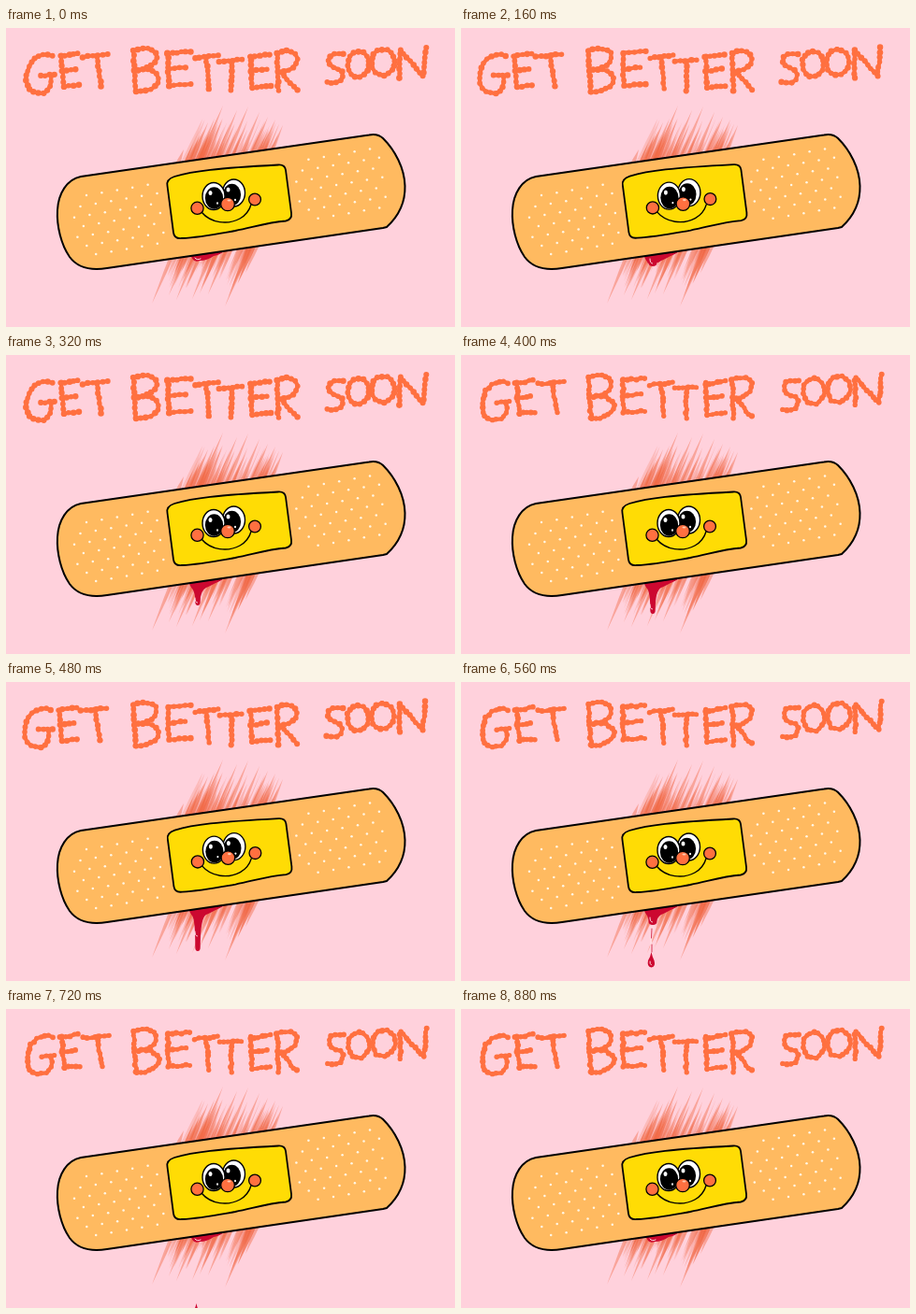
These frames come from a looping animation (480x320 px, 0.96 s). An HTML page with a canvas:

```html
<!DOCTYPE html>
<html lang="en">
<head>
<meta charset="utf-8">
<title>Get better soon</title>
<style>
html, body { margin: 0; width: 100%; height: 100%; overflow: hidden; background: #ffd1dc; }
canvas { display: block; }
</style>
</head>
<body>
<canvas id="stage" width="480" height="320" role="img" aria-label="Get better soon"></canvas>
<script>
const ctx = document.getElementById('stage').getContext('2d');
const PINK = '#ffd1dc', ORANGE = '#ff7040', SKIN = '#ffba60', YELLOW = '#ffdc05', BLOOD = '#cc0830';
const STEP = 80, STEPS = 12;

function seeded(seed) {
  return () => {
    seed = (seed * 1664525 + 1013904223) >>> 0;
    return seed / 4294967296;
  };
}

function shape(d, fill, stroke, width = 1.8) {
  const path = new Path2D(d);
  if (fill) { ctx.fillStyle = fill; ctx.fill(path); }
  if (stroke) { ctx.strokeStyle = stroke; ctx.lineWidth = width; ctx.stroke(path); }
}

function oval(x, y, rx, ry, fill, stroke, width = 1.4, angle = 0) {
  ctx.beginPath();
  ctx.ellipse(x, y, rx, ry, angle, 0, Math.PI * 2);
  ctx.fillStyle = fill;
  ctx.fill();
  if (stroke) { ctx.strokeStyle = stroke; ctx.lineWidth = width; ctx.stroke(); }
}

// Hand lettering, one entry per word, one path per pen stroke.
const words = [
  ['M50 30C36 23 24 36 22 50C20 67 31 72 41 69C48 66 48 60 48 52', 'M37 51L52 50',
   'M59 30L62 63', 'M58 30L77 27', 'M60 46L74 44', 'M62 63L78 61',
   'M82 31L109 28', 'M97 30L102 62'],
  ['M136 24L139 68', 'M136 24C150 20 162 22 161 31C160 40 150 44 141 45',
   'M141 45C155 42 165 48 163 56C162 64 151 68 139 68',
   'M173 27L174 62', 'M173 27L197 25', 'M174 44L192 42', 'M174 62L197 60',
   'M202 32L227 29', 'M214 31L217 65', 'M228 36L252 34', 'M241 36L241 67',
   'M262 30L263 64', 'M261 31L282 28', 'M262 46L279 44', 'M263 64L283 62',
   'M290 27L291 67', 'M290 27C303 21 313 26 311 35C309 43 301 46 292 47', 'M294 47L311 66'],
  ['M361 28C353 25 344 29 344 35C345 44 361 42 360 51C359 59 350 60 343 58',
   'M377 25C368 25 364 34 366 43C368 53 378 55 384 49C391 41 388 25 377 25',
   'M402 23C392 24 389 34 392 43C395 52 406 53 412 46C419 36 415 22 402 23',
   'M421 54L421 23L446 52L449 21']
];

function samplePath(d, gap) {
  const path = document.createElementNS('http://www.w3.org/2000/svg', 'path');
  path.setAttribute('d', d);
  const length = path.getTotalLength(), count = Math.round(length / gap);
  return Array.from({ length: count + 1 }, (_, i) => path.getPointAtLength(length * i / count));
}

// Three wobbling versions of the lettering.
const looks = [
  { seed: 11, gap: 5.2, radius: 3, jitter: 0.6, shift: [0, 0, 0] },
  { seed: 57, gap: 5.4, radius: 3, jitter: 0.6, shift: [-2, 0, -0.5] },
  { seed: 93, gap: 4.6, radius: 2.8, jitter: 0.9, shift: [0.5, 0, 0.5] }
].map(look => {
  const random = seeded(look.seed);
  const beads = words.map((strokes, w) => strokes.map(d => samplePath(d, look.gap).map(p => ({
    x: p.x + look.shift[w] + (random() - 0.5) * look.jitter * 2,
    y: p.y + (random() - 0.5) * look.jitter * 2,
    r: look.radius + (random() - 0.5) * 0.7
  }))));
  return beads.flat();
});

function drawLettering(look) {
  ctx.strokeStyle = ORANGE;
  ctx.lineWidth = 4.2;
  for (const beads of look) {
    ctx.beginPath();
    beads.forEach(b => ctx.lineTo(b.x, b.y));
    ctx.stroke();
    beads.forEach(b => oval(b.x, b.y, b.r, b.r, ORANGE));
  }
}

// Tapered brush hair, slanted like every stroke of the scratch.
function hair(tipX, tipY, rootY, width, alpha) {
  const x = tipX + (tipY - rootY) * 0.42, midX = (x + tipX) / 2, midY = (rootY + tipY) / 2;
  ctx.globalAlpha = alpha;
  shape(`M${x - width} ${rootY}Q${midX - width * 0.8} ${midY} ${tipX} ${tipY}` +
        `Q${midX + width * 0.8} ${midY} ${x + width} ${rootY}Z`, '#f0643f');
  ctx.globalAlpha = 1;
}

function drawScratches() {
  const random = seeded(7);
  const upper = [[190, 130], [207, 115], [216, 101], [223, 97], [232, 83], [247, 88], [259, 84],
                 [271, 90], [280, 95], [288, 98], [296, 104]];
  const lower = [[156, 295], [174, 286], [182, 291], [193, 278], [199, 290], [207, 284], [216, 285],
                 [234, 298], [238, 287], [248, 273], [256, 262]];
  const brush = (tips, rootY, left, right, reach) => {
    tips.forEach(([x, y]) => hair(x, y, rootY, 3, 0.42));
    for (let i = 0; i < 75; i++) {
      const tipY = rootY + reach * (0.45 + random() * 0.55);
      const rootX = left + random() * (right - left);
      hair(rootX + (rootY - tipY) * 0.42, tipY, rootY, 1 + random() * 3, 0.15 + random() * 0.25);
    }
  };
  brush(upper, 150, 188, 276, -54);
  brush(lower, 225, 186, 268, 54);
}

// Lowest point of the hanging drip at each step.
const dripEnds = [250, 251, 255, 260, 268, 277, 288, 260, 254, 250, 250, 250];

function drawBlood(step) {
  const end = dripEnds[step], long = Math.max(0, end - 256);
  shape('M197 243L234 238Q229 243 222 244Q215 249 207 249Q203 251 200 248Z', BLOOD);
  if (end > 250) {
    const neck = Math.min(end - 3, 252), half = long > 8 ? 2.7 : 4.5;
    shape(`M195 242Q197 248 199 ${neck - 2}Q${205 - half} ${neck + 2} ${205 - half} ${end - 4}` +
          `Q${205 - half} ${end} 205 ${end}Q${205 + half} ${end} ${205 + half} ${end - 4}` +
          `Q${205 + half} ${neck} 214 ${neck - 3}Q219 247 233 239Z`, BLOOD);
  }
  if (step < 2 || step > 8) {
    shape('M202 246Q204 249 208 247', null, '#ffe6e9', 1);
  } else {
    const low = Math.min(end - 3, 272);
    shape(`M202 ${low - 5}Q202 ${low} 204.5 ${low}`, null, '#ffdce2', 1);
  }
  if (step === 7) {
    ctx.setLineDash([3, 2]);
    shape('M204.5 263Q202 275 204 290', null, '#ffdce2', 2.4);
    ctx.setLineDash([]);
    shape('M204 264L203.5 274M204 281L204 289', null, BLOOD, 0.8);
  }
  const dropTop = { 7: 289, 8: 302, 9: 315 }[step];
  if (dropTop) {
    ctx.save();
    ctx.translate(203.5, dropTop);
    shape('M0 0Q1 5 3 9Q5 16 0 16.5Q-5 16 -3.5 9Q-1 5 0 0Z', BLOOD);
    shape('M-1.5 10Q-2 13 0 14', null, '#ffdce2', 1);
    ctx.restore();
  }
}

function drawDots() {
  const field = (x, y, rows) => rows.forEach(([first, count], row) => {
    for (let i = first; i < first + count; i++) {
      const along = i * 16.4 + (row % 2) * 8.2;
      oval(x + along + row * 1.7, y - along * 0.17 + row * 10.5, 1.25, 1.25, '#fff6e4');
    }
  });
  field(86, 179, [[0, 5], [-1, 6], [-1, 6], [-1, 6], [-1, 6], [-1, 6], [0, 5]]);
  field(307, 143.5, [[1, 5], [0, 6], [0, 6], [0, 6], [0, 6], [0, 6], [1, 5]]);
}

function drawBandage() {
  shape('M80 159L388 114.5Q397 112.5 403 118C416 131 426 150 426.5 169' +
        'C427 188 419 202 407 213L403 214L108 257C89 260 76 256 68 245' +
        'C59 232 54 212 55 195C56 177 65 162 80 159Z', SKIN, '#000', 2);
  drawDots();
}

function drawEye(x, y, pupilX, pupilY) {
  oval(x, y, 12, 14.5, '#fff', '#000');
  oval(pupilX, pupilY, 9.6, 11.8, '#000');
  oval(pupilX - 4, pupilY - 5.5, 2, 2.6, '#fff');
  oval(pupilX + 3.5, pupilY + 5.5, 1, 1.2, '#fff');
}

function drawFace(shift) {
  ctx.save();
  ctx.translate(shift, -shift);
  shape('M180 159C200 153 225 150 291 146.5Q298 146 299 152L305 198Q306 205 299 206.5' +
        'C280 208 265 213 245 217C225 220.5 208 224 188 225Q180 226 179 219L172.5 169Q171 162 180 159Z',
        YELLOW, '#000', 1.8);
  drawEye(243.5, 176.5, 241.5, 178.5);
  drawEye(222, 180, 222.5, 182);
  shape('M209 197C219 209 237 211 250 204Q259 199 262 189', null, '#000', 1.4);
  oval(204.5, 192.8, 6.6, 6.6, ORANGE, '#000', 1.3);
  oval(266, 183.5, 6.4, 6.4, ORANGE, '#000', 1.3);
  oval(237, 188.5, 7.3, 7.2, ORANGE, '#000', 1.3);
  oval(238.5, 184.5, 2, 1.1, '#ffc9ae');
  ctx.restore();
}

function draw(step) {
  const pose = step % 2 ? 2 : step % 4 / 2;
  ctx.fillStyle = PINK;
  ctx.fillRect(0, 0, 480, 320);
  ctx.lineCap = ctx.lineJoin = 'round';
  drawScratches();
  drawBlood(step);
  drawBandage();
  drawFace(pose === 1 ? 0.4 : 0);
  drawLettering(looks[pose]);
}

let shown = -1;
const start = performance.now();
function tick(now) {
  const step = Math.floor(Math.max(0, now - start) / STEP) % STEPS;
  if (step !== shown) draw(shown = step);
  requestAnimationFrame(tick);
}
draw(0);
requestAnimationFrame(tick);
</script>
</body>
</html>
```
